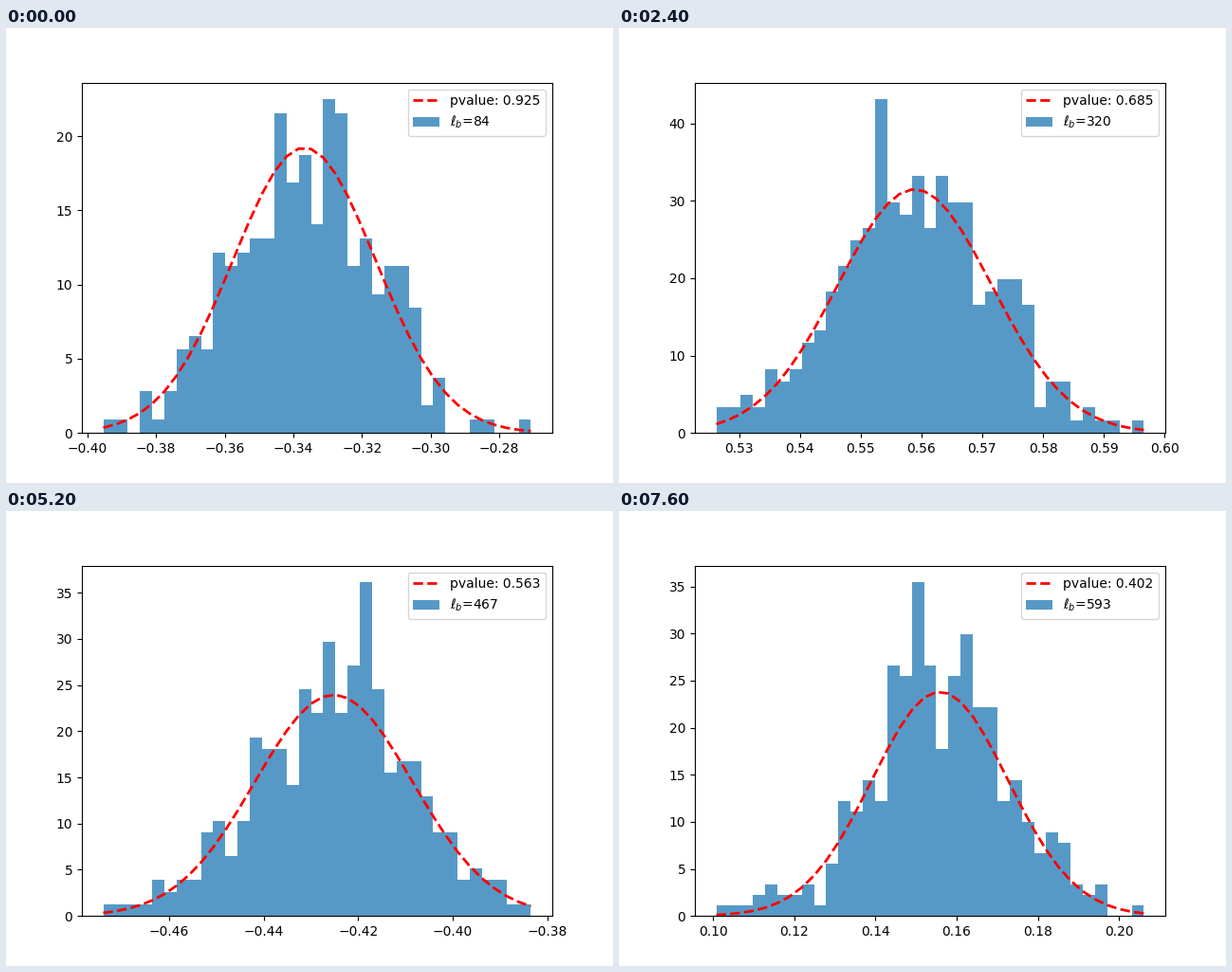
Recreate the animation shown at these times as a matplotlib script. Size 640 px wide and 480 px high, loop 8000 ms.

```python
import numpy as np
import matplotlib.pyplot as plt
from matplotlib.animation import FuncAnimation

BINS = 35
SAMPLES = 300
INTERVAL = 400
ROUGHNESS = 0.7

# Bin centres: wide bins first, then narrow ones.
ELLS = [*range(84, 290, 41), *range(320, 594, 21)]

# Key points: ell, p-value, mean, sigma, low, high, tallest bin and its count.
KEYS = np.array([
    (84, 0.925, -0.3368, 0.02076, -0.39536, -0.27080, 18, 24),
    (166, 0.350, -0.5641, 0.02346, -0.65900, -0.49359, 19, 26),
    (320, 0.685, 0.5589, 0.01267, 0.52626, 0.59660, 13, 26),
    (383, 0.309, 0.1632, 0.01260, 0.13000, 0.20464, 14, 22),
    (467, 0.563, -0.4252, 0.01666, -0.47394, -0.38349, 21, 28),
    (551, 0.049, 0.0260, 0.02058, -0.05533, 0.08085, 22, 32),
    (593, 0.402, 0.1559, 0.01675, 0.10080, 0.20615, 16, 32),
])


def normal_density(x, mean, sigma):
    return np.exp(-0.5 * ((x - mean) / sigma) ** 2) / (sigma * np.sqrt(2 * np.pi))


def bin_counts(expected, peak_bin, peak_count, seed):
    """Scatter the expected counts below one tallest bin; both end bins are filled."""
    noise = np.random.default_rng(seed).normal(0, ROUGHNESS, BINS)
    counts = np.round(expected + noise * np.sqrt(expected))
    counts = np.clip(counts, 0, peak_count - 1)
    counts[[0, -1]] = np.maximum(counts[[0, -1]], 1)
    counts[peak_bin] = peak_count
    return counts


fig, ax = plt.subplots(figsize=(6.4, 4.8), dpi=100)


def draw(frame):
    ell = ELLS[frame]
    pvalue, mean, sigma, low, high, peak_bin, peak_count = (
        np.interp(ell, KEYS[:, 0], column) for column in KEYS[:, 1:].T)
    edges = np.linspace(low, high, BINS + 1)
    centers = (edges[:-1] + edges[1:]) / 2
    scale = SAMPLES * (edges[1] - edges[0])
    counts = bin_counts(scale * normal_density(centers, mean, sigma),
                        round(peak_bin), round(peak_count), ell)

    ax.clear()
    _, _, bars = ax.hist(centers, bins=edges, weights=counts / scale,
                         alpha=0.75, label=rf"$\ell_b$={ell}")
    curve, = ax.plot(edges, normal_density(edges, mean, sigma), "r--",
                     linewidth=2, label=f"pvalue: {pvalue:.3f}")
    ax.legend(handles=[curve, bars[0]], loc="upper right")


animation = FuncAnimation(fig, draw, frames=len(ELLS), init_func=lambda: None,
                          interval=INTERVAL, repeat=True, repeat_delay=0)
plt.show()
```
